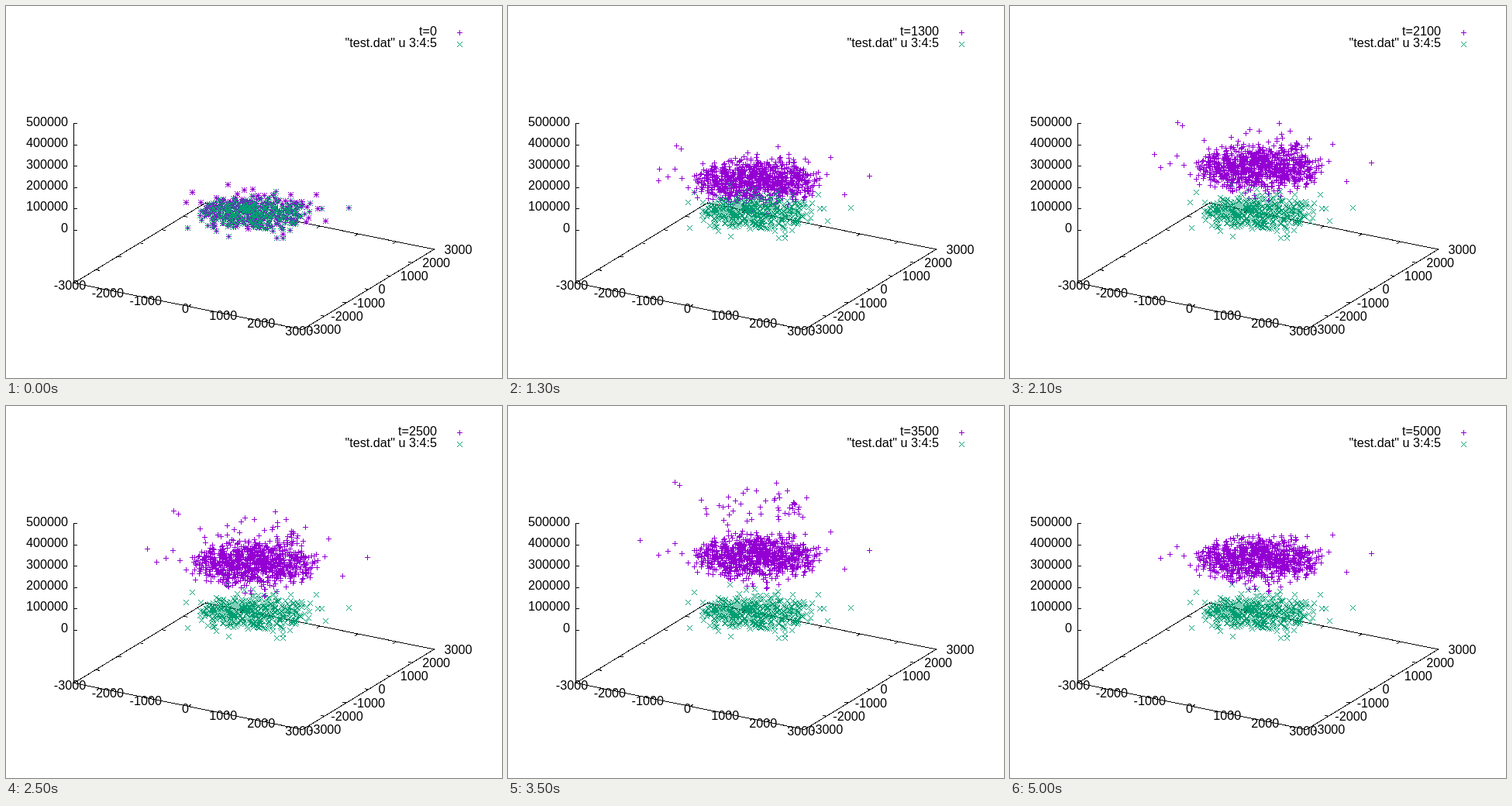
An HTML page that plays this animation: 640 by 480 pixels, repeating every 5100 ms.

```html
<!DOCTYPE html>
<html lang="en">
<head>
<meta charset="utf-8">
<title>Particle cloud</title>
<style>
html, body { margin: 0; width: 100%; height: 100%; overflow: hidden; background: #fff; }
svg { display: block; }
text { font: 16.18px "Liberation Sans", Arial, sans-serif; fill: #000; }
path { shape-rendering: crispEdges; fill: none; }
</style>
</head>
<body>
<svg id="stage" width="640" height="480" viewBox="0 0 640 480"></svg>
<script>
const PURPLE = '#9400d3', TEAL = '#009e73';
const STEP = 100, STEPS = 51;
const stage = document.getElementById('stage');

function add(tag, attrs, content) {
  const el = document.createElementNS('http://www.w3.org/2000/svg', tag);
  for (const k in attrs) el.setAttribute(k, attrs[k]);
  if (content !== undefined) el.textContent = content;
  stage.appendChild(el);
  return el;
}
const label = (x, y, s, anchor) =>
  add('text', { x, y: Math.round(y), 'text-anchor': anchor }, s);

// Seeded random numbers
let seed = 20417;
function rnd() {
  seed = (seed + 0x6D2B79F5) | 0;
  let r = Math.imul(seed ^ (seed >>> 15), 1 | seed);
  r = (r + Math.imul(r ^ (r >>> 7), 61 | r)) ^ r;
  return ((r ^ (r >>> 14)) >>> 0) / 4294967296;
}
const bell = () => rnd() + rnd() + rnd() + rnd() - 2;

// Elliptic disc of points with a soft edge; a low power favours the rim
function cloud(n, cx, cy, rx, ry, power, fuzz) {
  return Array.from({ length: n }, () => {
    const a = rnd() * 2 * Math.PI, r = Math.pow(rnd(), power);
    return [cx + rx * r * Math.cos(a) + bell() * fuzz,
            cy + ry * r * Math.sin(a) + bell() * fuzz];
  });
}

// Markers, 7 by 7 pixels
function plus([x, y]) {
  x = Math.round(x); y = Math.round(y);
  return `M${x - 3} ${y + 0.5}h7M${x + 0.5} ${y - 3}v7`;
}
function cross([x, y]) {
  x = Math.round(x); y = Math.round(y);
  let d = '';
  for (let i = -3; i <= 3; i++) {
    d += `M${x + i} ${y + i}h1v1h-1z`;
    if (i) d += `M${x + i} ${y - i}h1v1h-1z`;
  }
  return d;
}
const draw = (pts, mark) => pts.map(mark).join('');

// Axes: a corner and the two base edges, six divisions each
const O = [87.5, 357.5], U = [49.17, 10], V = [28.33, -17.25];
const at = (i, j) => [O[0] + U[0] * i + V[0] * j, O[1] + U[1] * i + V[1] * j];
const seg = (a, dx, dy) => `M${a}l${dx} ${dy}`;
let axes = `M87.5 151V358M${at(0, 0)}L${at(6, 0)}L${at(6, 6)}L${at(0, 6)}L${at(0, 0)}`;
for (let i = 0; i <= 6; i++) {
  axes += seg(at(i, 0), 4.2, -2.6) + seg(at(i, 6), -4.2, 2.6) +
          seg(at(0, i), 4.9, 1) + seg(at(6, i), -4.9, -1);
}
for (let i = 0; i < 6; i++) axes += `M87 ${Math.round(289 - 27.6 * i) + 0.5}h5`;
add('path', { d: axes, stroke: '#000' });

for (let i = 0; i < 6; i++) label(80, 291.8 - 27.35 * i, i * 100000, 'end');
for (let i = 0; i <= 6; i++) {
  const v = (i - 3) * 1000, pad = v >= 0 ? 4.5 : 0;
  label(82.5 + 48.9 * i + pad / 2, 366 + 9.85 * i, v, 'middle');
  label(391 + 28.33 * i + pad, 423 - 17.2 * i, v, 'start');
}

// Resting points
const core = [[234, 286], [442, 260], [407, 261], [349, 299], [357, 299]]
  .concat(cloud(360, 320, 266, 64, 15, 0.6, 12));
const rim = [[232, 253], [240, 240], [286, 230], [400, 243], [412, 277]]
  .concat(cloud(100, 323, 264, 68, 19, 0.3, 11));

// Rising points, placed where they peak
const PEAK = 73.6;
const rising = [[194, 191], [206, 186], [215, 176], [416, 161], [434, 209], [466, 185]]
  .concat(cloud(70, 320, 194, 92, 31, 0.3, 12), cloud(830, 321, 193, 73, 19, 0.6, 15))
  .map(([x, y]) => [x, y + PEAK]);

// Points that never slow down, placed at 3.5 s; they leave at 4.3 s
const SPEED = 37.4, LEAVE = 4.3;
const free = [[215, 98], [221, 102], [346, 99]]
  .concat(cloud(48, 315, 131, 68, 19, 0.5, 9));

function positions(s) {
  if (s === 0) return core.concat(rim);
  const fall = 4.6 * (s * s - 8 * s);
  const pts = rising.map(([x, y]) => [x, y + fall]);
  if (s < LEAVE) {
    for (const [x, y] of free) pts.push([x + 0.7 * (3.5 - s), y + SPEED * (3.5 - s)]);
    pts.push([210.5 - 11.6 * s, 253 - 2.2 * s + fall]);
  }
  return pts;
}

const moving = add('path', { stroke: PURPLE });
const rimMarks = add('path', { d: draw(rim, cross) });
add('path', { d: draw(core, cross) }).style.fill = TEAL;

// Key
const clock = label(556, 38, 't=0', 'end');
label(556, 53, '"test.dat" u 3:4:5', 'end');
add('path', { d: plus([585, 34]), stroke: PURPLE });
add('path', { d: cross([585, 49]) }).style.fill = TEAL;

let shown = -1;
function show(k) {
  if (k === shown) return;
  shown = k;
  const t = k * STEP;
  clock.textContent = 't=' + t;
  moving.setAttribute('d', draw(positions(t / 1000), plus));
  rimMarks.style.fill = k ? TEAL : PURPLE;
}

let start = null;
function tick(now) {
  if (start === null) start = now;
  show(Math.floor((now - start) / STEP) % STEPS);
  requestAnimationFrame(tick);
}
show(0);
requestAnimationFrame(tick);
</script>
</body>
</html>
```
